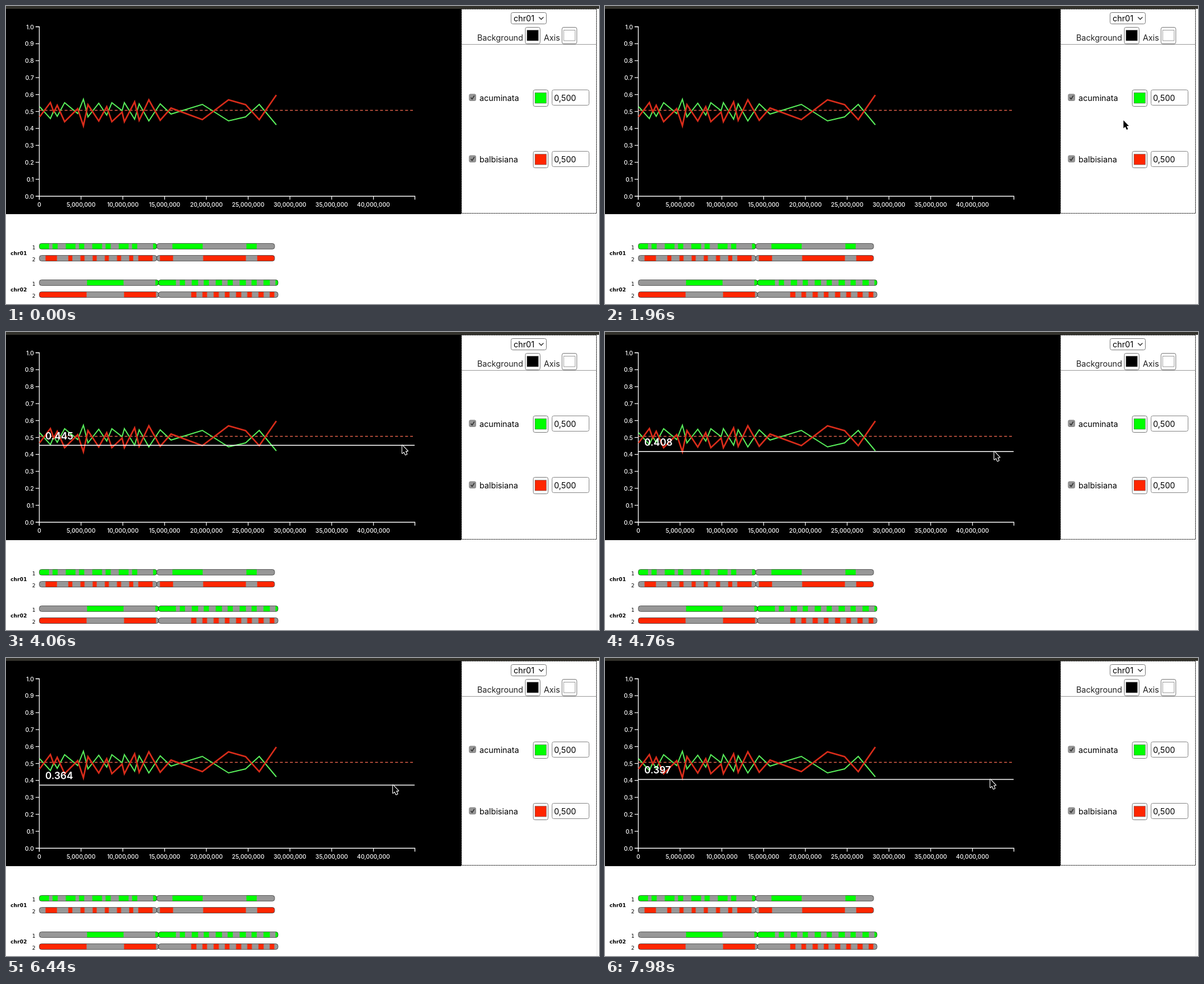
An HTML page with a canvas that plays this animation: 1042 by 524 pixels, repeating every 8 s.

```html
<!DOCTYPE html>
<html lang="en">
<head>
<meta charset="utf-8">
<title>Chromosome ancestry</title>
<style>
html, body { margin: 0; width: 100%; height: 100%; overflow: hidden; background: #fff; }
canvas { display: block; width: 1042px; height: 524px; }
</style>
</head>
<body>
<canvas id="stage" width="1042" height="524"></canvas>
<script>
const ctx = document.getElementById('stage').getContext('2d');
const LOOP = 8000, STEP = 70;
const UI = '14.2px Inter, sans-serif';
const AXIS = '500 10.2px Inter, sans-serif';
const READOUT = '600 17px Inter, sans-serif';
const LABEL = '9px "DejaVu Sans", sans-serif';
const GREEN = '#00ff00', RED = '#ff2600', BAR = '#979797';

// turning points of one series; the other runs against it
const acuminata = [[59, 177], [78, 198], [84, 184], [90, 194], [103, 170], [126, 189], [136, 164], [144, 195],
  [163, 171], [177, 192], [186, 170], [204, 184], [208, 170], [226, 199], [234, 172], [251, 202], [271, 172],
  [290, 190], [345, 173], [391, 202], [421, 195], [445, 173], [475, 209]];
const balbisiana = acuminata.map(([x, y]) => [x, 186 - 1.2 * (y - 184.5)]);

// large blocks, then a run of evenly spaced bands that alternate in width
const bars = [
  { y: 417.5, mid: 265, end: 472, color: GREEN, blocks: [[258, 265], [292, 346], [422, 441]],
    run: { from: 58, pitch: 23.3, count: 8, widths: [18, 10] } },
  { y: 438.5, mid: 265, end: 472, color: RED, blocks: [[69, 90], [232, 258], [270, 294], [346, 422], [441, 472]],
    run: { from: 109, pitch: 21.4, count: 6, widths: [8, 8] } },
  { y: 481.5, mid: 268, end: 478, color: GREEN, blocks: [[142, 207], [262, 299]],
    run: { from: 305, pitch: 21, count: 9, widths: [10, 12] } },
  { y: 502.5, mid: 268, end: 478, color: RED, blocks: [[58, 142], [207, 264]],
    run: { from: 325, pitch: 19.7, count: 8, widths: [10, 9] } }
];

// pointer: time, x, y
const path = [[630, 935, 330], [1050, 911, 201], [2100, 911, 201], [2660, 909, 161], [3290, 909, 161],
  [4130, 692, 200], [4760, 684, 210.3], [5880, 682, 229.1], [7140, 677, 215.7], [7980, 677, 213.6]];

function rect(x, y, w, h, color) {
  ctx.fillStyle = color;
  ctx.fillRect(x, y, w, h);
}

function text(str, x, y, font, color, align = 'left') {
  ctx.font = font;
  ctx.fillStyle = color;
  ctx.textAlign = align;
  ctx.fillText(str, x, y);
}

function line(points, color, width = 1) {
  ctx.beginPath();
  points.forEach(([x, y]) => ctx.lineTo(x, y));
  ctx.strokeStyle = color;
  ctx.lineWidth = width;
  ctx.stroke();
}

function box(x, y, w, h, r, stroke, fill = '#fff') {
  ctx.beginPath();
  ctx.roundRect(x, y, w, h, r);
  ctx.fillStyle = fill;
  ctx.fill();
  ctx.strokeStyle = stroke;
  ctx.lineWidth = 1;
  ctx.stroke();
}

function dashed(pattern, draw) {
  ctx.setLineDash(pattern);
  draw();
  ctx.setLineDash([]);
}

function drawAxes() {
  line([[52, 36.5], [58.5, 36.5], [58.5, 334.5], [52, 334.5]], '#fff', 1.3);
  line([[58.5, 340.5], [58.5, 334.5], [718.5, 334.5], [718.5, 340.5]], '#fff', 1.3);
  for (let i = 0; i <= 10; i++) {
    const y = 334.5 - i * 29.8;
    line([[52, y], [58.5, y]], '#fff', 1.2);
    text((i / 10).toFixed(1), 49, y + 4, AXIS, '#fff', 'right');
  }
  for (let i = 0; i <= 8; i++) {
    const x = 58.5 + i * 73.4;
    line([[x, 334.5], [x, 340.5]], '#fff', 1.2);
    text((i * 5e6).toLocaleString('en-US'), x, 353, AXIS, '#fff', 'center');
  }
}

function drawChart() {
  rect(0, 5, 800, 361, '#000');
  drawAxes();
  dashed([5, 3.8], () => line([[59, 183.5], [715, 183.5]], '#e0604a', 1.4));
  line(acuminata, '#58ee5a', 2);
  line(balbisiana, '#d82c1a', 2.7);
}

function swatch(x, y, color) {
  box(x + .5, y + .5, 26, 29, 3, '#777');
  box(x + 3.5, y + 5.5, 20, 18.5, 0, 'rgba(90, 90, 90, .6)', color);
}

function drawRow(name, y, color, hover) {
  if (hover) rect(813, y - 13, 112, 27, '#e6e6e6');
  box(814, y - 6, 11.5, 11.5, 2, '#858585', '#969696');
  line([[816.8, y], [819, y + 2.6], [823, y - 3.4]], '#333', 1.7);
  text(name, 832, y + 6, UI, '#000');
  swatch(926, y - 14, color);
  box(959.5, y - 13.5, 65, 27, 3, '#858585');
  text('0,500', 963, y + 6, UI, '#000');
}

function drawPanel(hover) {
  dashed([2, 1], () => {
    ctx.strokeStyle = '#000';
    ctx.lineWidth = 1;
    ctx.strokeRect(800.5, 5.5, 237, 359);
  });
  box(887.5, 11.5, 62, 20, 3, '#777');
  text('chr01', 892, 27, UI, '#000');
  line([[936.5, 19.5], [940.5, 23.5], [944.5, 19.5]], '#222', 1.3);
  text('Background', 828, 60.5, UI, '#222');
  swatch(912, 37, '#000');
  text('Axis', 945, 60.5, UI, '#222');
  swatch(976.5, 37, '#fff');
  line([[801, 67.5], [1037, 67.5]], '#999');
  drawRow('acuminata', 161, GREEN, hover);
  drawRow('balbisiana', 269, RED, false);
}

function bands({ blocks, run }) {
  const small = Array.from({ length: run.count }, (_, i) => {
    const x = run.from + i * run.pitch;
    return [x, x + run.widths[i % 2]];
  });
  return [...blocks, ...small];
}

function drawArm(x0, x1, y, color, spans) {
  ctx.save();
  ctx.beginPath();
  ctx.roundRect(x0, y, x1 - x0, 10, 4);
  ctx.clip();
  rect(x0, y, x1 - x0, 10, BAR);
  for (const [a, b] of spans) {
    ctx.globalAlpha = .55;
    rect(a, y, b - a, 10, color);
    ctx.globalAlpha = 1;
    rect(a + 1, y, b - a - 2, 10, color);
  }
  ctx.restore();
  ctx.beginPath();
  ctx.roundRect(x0, y, x1 - x0, 10, 4);
  ctx.strokeStyle = 'rgba(40, 40, 40, .7)';
  ctx.lineWidth = 1;
  ctx.stroke();
}

function drawGenome() {
  bars.forEach((bar, i) => {
    const spans = bands(bar);
    drawArm(58.5, bar.mid, bar.y, bar.color, spans);
    drawArm(bar.mid, bar.end, bar.y, bar.color, spans);
    text(1 + i % 2, 46, bar.y + 10.5, LABEL, '#000');
  });
  text('chr01', 8, 438, 'bold ' + LABEL, '#000');
  text('chr02', 8, 502, 'bold ' + LABEL, '#000');
}

function pointerAt(t) {
  const i = path.findIndex(p => p[0] > t);
  if (i === 0) return null;
  if (i < 0) return path[path.length - 1].slice(1);
  const [t0, x0, y0] = path[i - 1], [t1, x1, y1] = path[i];
  const u = (t - t0) / (t1 - t0), k = u * u * (3 - 2 * u);
  return [x0 + (x1 - x0) * k, y0 + (y1 - y0) * k];
}

const arrow = new Path2D('M0 0V14L3.1 11.2L5.6 16.6L8 15.5L5.6 10.1H9.6Z');
const hand = new Path2D('M-2 1.2C-2-.6 .6-.8 1 1L2 5.4C3-.1 4.5 4.2 5 5.8C5.5 4.8 7 5 7.4 6.5' +
  'C8.4 5.8 9.4 6.5 9.6 8C10 10.5 9.4 12 8.6 15.8H1.5C.2 13.3-2.5 11.3-4.3 9.2C-5.4 7.4-3.4 6.6-2.2 7.8L-.6 9.4Z');

function drawPointer(x, y, hover) {
  const shape = hover ? hand : arrow;
  ctx.save();
  ctx.translate(x, y);
  ctx.lineJoin = 'round';
  ctx.lineWidth = hover ? 1.2 : 2.2;
  ctx.strokeStyle = hover ? '#111' : '#fff';
  ctx.fillStyle = hover ? '#fff' : '#000';
  if (hover) ctx.fill(shape);
  ctx.stroke(shape);
  if (!hover) ctx.fill(shape);
  ctx.restore();
}

function drawReadout(y) {
  line([[59, y], [718, y]], '#fff', 1.5);
  text(((331.9 - y) / 298).toFixed(3), 69, y - 10.5, READOUT, '#fff');
}

function draw(t) {
  const pointer = pointerAt(t);
  const [px, py] = pointer || [-1, -1];
  const hover = px > 813 && px < 925 && py > 148 && py < 175;
  rect(0, 0, 1042, 524, '#fff');
  rect(0, 0, 1042, 5, '#33322c');
  line([[1038.5, 5], [1038.5, 524]], '#e4e4e4');
  drawChart();
  drawPanel(hover);
  drawGenome();
  if (px > 59 && px < 718) drawReadout(py);
  if (pointer) drawPointer(px, py, hover);
}

const start = performance.now();
function tick() {
  const t = (performance.now() - start) % LOOP;
  draw(Math.floor(t / STEP) * STEP);
  requestAnimationFrame(tick);
}
tick();
</script>
</body>
</html>
```
